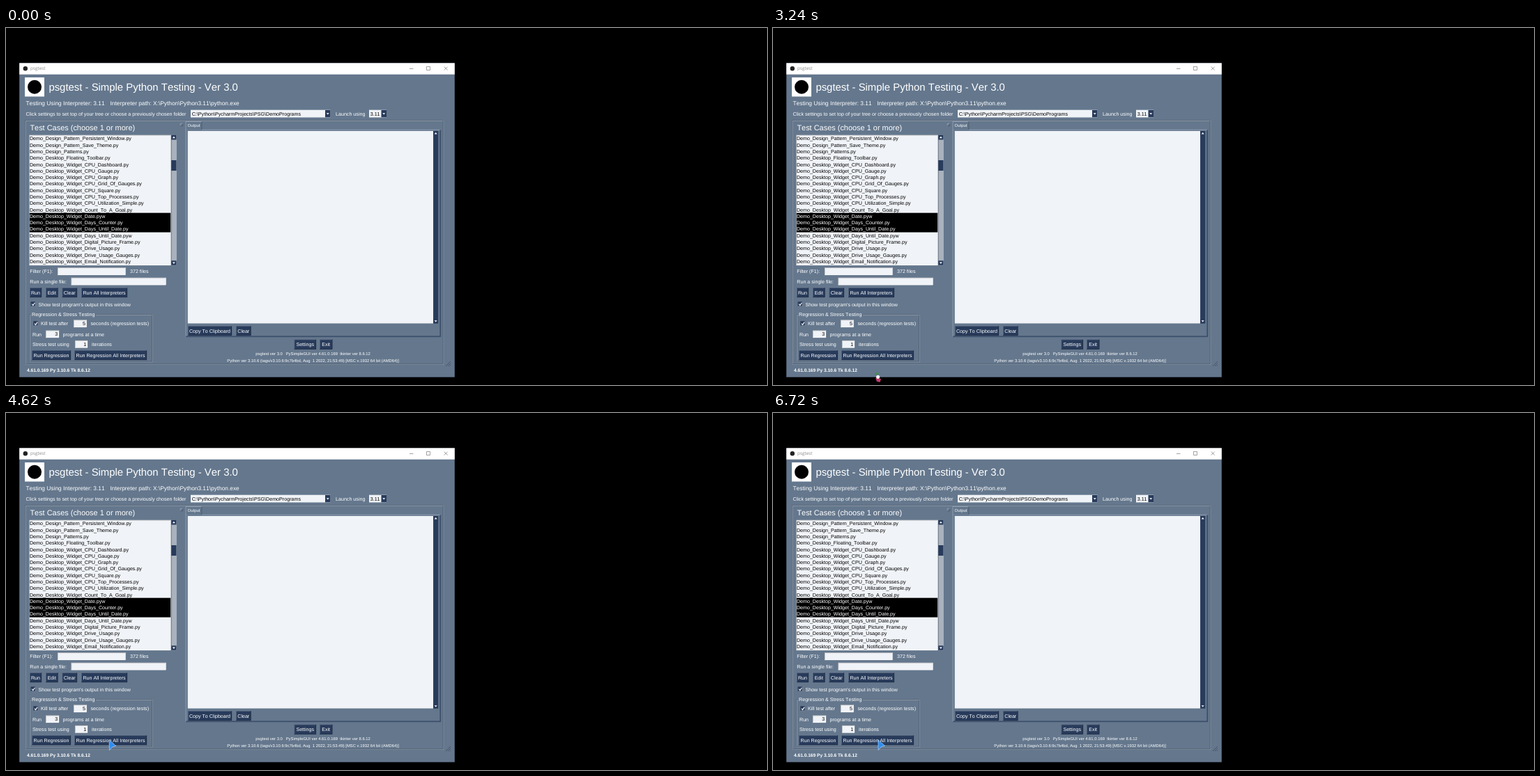
Recreate the animation shown at these times as an HTML page. Size 1092 px wide and 513 px high, loop 8 s.

```html
<!DOCTYPE html>
<html lang="en">
<head>
<meta charset="utf-8">
<title>psgtest</title>
<style>
  html, body { margin: 0; width: 100%; height: 100%; overflow: hidden; background: #000; }
  svg { display: block; width: 100vw; height: 100vh; }
  text {
    font-family: "Liberation Sans", Arial, sans-serif;
    font-kerning: none;
    text-rendering: geometricPrecision;
    white-space: pre;
  }
</style>
</head>
<body>
<svg id="stage" viewBox="0 0 1092 513"></svg>
<script>
const PANEL = '#64778d', NAVY = '#283b5b', FIELD = '#f0f3f7';
const LIGHT = '#b2bbc6', SHADE = '#3c4755', HAIR = 0.55;
const LOOP = 8000;
const parts = [];

const add = markup => parts.push(markup);
const rect = (x1, y1, x2, y2, fill, extra = '') =>
  add(`<rect x="${x1}" y="${y1}" width="${x2 - x1}" height="${y2 - y1}" fill="${fill}" ${extra}/>`);
const path = (d, stroke, width = HAIR, fill = 'none') =>
  add(`<path d="${d}" fill="${fill}" stroke="${stroke}" stroke-width="${width}"/>`);
// Text is placed by its vertical centre.
const text = (x, cy, words, size = 7.13, fill = '#fff', extra = '') =>
  add(`<text x="${x}" y="${cy + size * 0.36}" font-size="${size}" fill="${fill}" ${extra}>${words}</text>`);

// Bevelled edge: one colour for top and left, another for bottom and right.
function bevel(x1, y1, x2, y2, topLeft, bottomRight) {
  const h = HAIR / 2;
  path(`M${x1 + h} ${y2}V${y1 + h}H${x2}`, topLeft);
  path(`M${x1} ${y2 - h}H${x2 - h}V${y1}`, bottomRight);
}

function groove(x1, y1, x2, y2) {
  bevel(x1, y1, x2, y2, SHADE, LIGHT);
  bevel(x1 + HAIR, y1 + HAIR, x2 - HAIR, y2 - HAIR, LIGHT, SHADE);
}

function button(x1, y1, x2, y2, label) {
  rect(x1, y1, x2, y2, NAVY);
  bevel(x1, y1, x2, y2, '#7f8ba0', '#182337');
  text((x1 + x2) / 2, (y1 + y2) / 2, label, 7.1, '#fff', 'text-anchor="middle"');
}

function field(x1, y1, x2, y2, value = '') {
  rect(x1, y1, x2, y2, FIELD);
  bevel(x1, y1, x2, y2, '#909294', '#fff');
  if (value) text(x2 - 1.7, (y1 + y2) / 2, value, 7.13, '#000', 'text-anchor="end"');
}

function arrowButton(x1, y1, x2, y2, dir) {
  rect(x1, y1, x2, y2, NAVY);
  const cx = (x1 + x2) / 2, cy = (y1 + y2) / 2;
  path(`M${cx - 2} ${cy - dir}h4l-2 ${dir * 2.4}z`, 'none', 0, '#fff');
}

function combo(x1, x2, value) {
  rect(x1, 117.7, x2, 128.5, FIELD);
  arrowButton(x2 - 7.5, 118, x2, 128.3, 1);
  text(x1 + 1.7, 123, value, 7.15, '#000');
}

function checkbox(x, y) {
  rect(x, y, x + 7, y + 7, NAVY);
  bevel(x, y, x + 7, y + 7, SHADE, LIGHT);
  path(`M${x + 1.5} ${y + 3.4}l1.6 1.9 2.6 -3.9`, '#fff', 1.1);
}

function titleBar() {
  rect(19.2, 50.4, 643.8, 66.7, '#fff');
  add('<circle cx="27.8" cy="58.3" r="3.2" fill="#222"/>');
  text(35, 58.2, 'psgtest', 6.35, '#888', 'style="font-family:\'Open Sans\',sans-serif"');
  path('M579 58.5h5.5M603.5 55.5h5v5h-5zM628.7 55.6l5 5M633.7 55.6l-5 5', '#555');
}

function header() {
  rect(27, 71, 55, 98.5, '#fff');
  add('<circle cx="41" cy="84.7" r="10" fill="#000"/>');
  text(61.4, 85, 'psgtest - Simple Python Testing - Ver 3.0', 14.9);
  text(28.5, 107.7, 'Testing Using Interpreter: 3.11', 8.38);
  text(149.5, 107.7, 'Interpreter path: X:\\Python\\Python3.11\\python.exe', 8.33);
  text(28.5, 123, 'Click settings to set top of your tree or choose a previously chosen folder', 7.15);
  combo(265, 465.5, 'C:\\Python\\PycharmProjects\\PSG\\DemoPrograms');
  text(473, 123, 'Launch using');
  combo(521, 546, '3.11');
}

function fileList() {
  const files = `Design_Pattern_Persistent_Window.py Design_Pattern_Save_Theme.py Design_Patterns.py
    Desktop_Floating_Toolbar.py Widget_CPU_Dashboard.py Widget_CPU_Gauge.py Widget_CPU_Graph.py
    Widget_CPU_Grid_Of_Gauges.py Widget_CPU_Square.py Widget_CPU_Top_Processes.py
    Widget_CPU_Utilization_Simple.py Widget_Count_To_A_Goal.py Widget_Date.pyw Widget_Days_Counter.py
    Widget_Days_Until_Date.py Widget_Days_Until_Date.pyw Widget_Digital_Picture_Frame.py
    Widget_Drive_Usage.py Widget_Drive_Usage_Gauges.py Widget_Email_Notification.py`.split(/\s+/);
  const top = 154.2, rowHeight = 9.29;
  text(34.4, 143.3, 'Test Cases (choose 1 or more)', 10.95);
  rect(33.3, 153.8, 236.6, 341, FIELD);
  bevel(33.3, 153.8, 236.6, 341, '#909294', '#fff');
  rect(33.8, top + 12 * rowHeight, 236.2, top + 15 * rowHeight, '#000');
  files.forEach((file, i) => {
    const name = 'Demo_' + file.replace(/^Widget/, 'Desktop_Widget');
    text(34, top + (i + .5) * rowHeight, name, 7.1, i > 11 && i < 15 ? '#fff' : '#000');
  });
  rect(237, 153.8, 244.7, 341, '#a9b2bd');
  bevel(237, 153.8, 244.7, 341, SHADE, LIGHT);
  arrowButton(237.2, 154, 244.5, 160.5, -1);
  rect(237.2, 190, 244.5, 205, NAVY);
  arrowButton(237.2, 334.3, 244.5, 340.8, 1);
}

function leftControls() {
  text(34.3, 349.6, 'Filter (F1):');
  field(74, 344.3, 171.5, 355);
  text(178, 349.6, '372 files');
  text(34.3, 364, 'Run a single file:');
  field(93.5, 358.8, 229.5, 369.3);
  button(34, 373, 51, 387, 'Run');
  button(57, 373, 74.5, 387, 'Edit');
  button(80.5, 373, 102, 387, 'Clear');
  button(108, 373, 174, 387, 'Run All Interpreters');
  checkbox(35.7, 393.3);
  text(46.5, 397, "Show test program's output in this window", 7.1);

  groove(33.6, 411.6, 210.6, 480);
  rect(36, 407, 129, 416, PANEL);
  text(37, 411.6, 'Regression &amp; Stress Testing', 7.15);
  checkbox(39.4, 421.2);
  text(50, 424.7, 'Kill test after');
  field(97, 419.4, 115.7, 430, '5');
  text(121.5, 424.7, 'seconds (regression tests)');
  text(38, 440, 'Run');
  field(57, 434.6, 76, 445, '3');
  text(81.5, 440, 'programs at a time');
  text(38, 454.3, 'Stress test using');
  field(99, 449, 117, 459.5, '1');
  text(123, 454.3, 'iterations');
  button(37, 463, 93, 477, 'Run Regression');
  button(98, 463, 202, 477, 'Run Regression All Interpreters');
}

function outputPane() {
  rect(250, 137, 254, 141, PANEL);
  bevel(250, 137, 254, 141, LIGHT, SHADE);
  bevel(257.8, 146, 624, 444, LIGHT, NAVY);
  path('M623 146.5V443H258.5', NAVY, .8);
  rect(258, 134.3, 281, 146.6, PANEL);
  path('M258 146.6V134.5H280.8', LIGHT);
  path('M280.8 134.5V146', SHADE);
  text(260.5, 140.3, 'Output', 6);
  rect(260.8, 148, 613, 424.5, FIELD);
  rect(613.2, 148, 620.2, 424.5, NAVY);
  arrowButton(613.4, 148.3, 620, 154.5, -1);
  arrowButton(613.4, 418, 620, 424.3, 1);
  button(261, 428, 324, 442, 'Copy To Clipboard');
  button(330, 428, 351.5, 442, 'Clear');
}

function footer() {
  const centred = 'text-anchor="middle"';
  button(413.5, 447.5, 445, 461.7, 'Settings');
  button(450, 447.5, 468.3, 461.7, 'Exit');
  text(440.6, 468, 'psgtest ver 3.0   PySimpleGUI ver 4.61.0.169  tkinter ver 8.6.12', 5.87, '#fff', centred);
  text(440.6, 478, 'Python ver 3.10.6 (tags/v3.10.6:9c7b4bd, Aug  1 2022, 21:53:49) [MSC v.1932 64 bit (AMD64)]',
    5.87, '#fff', centred);
  text(30, 492, '4.61.0.169 Py 3.10.6 Tk 8.6.12', 6.6, '#fff', 'font-weight="bold"');
  path('M631 486l7 -7M634 486l4 -4M637 486l1 -1', SHADE, .7);
}

rect(0, 0, 1092, 513, '#000');
rect(19.2, 50.4, 643.8, 501.7, PANEL);
titleBar();
header();
groove(27.2, 132.5, 628, 483.8);
fileList();
leftControls();
outputPane();
footer();
add(`<g id="busy">
  <path d="M145.5 498l3 -3 3.5 1 -1.5 2.5z" fill="#3f8f4c"/>
  <path d="M147 503l8 1 -1.5 5 -4.5 -1z" fill="#c23a6c"/>
  <circle cx="150.6" cy="501.5" r="2.5" fill="#fff"/>
</g>
<path id="cursor" d="M0 0L9.8 8.6 4.7 10 .4 14.8Z" fill="#2f8df0" stroke="#c4dffa" stroke-width=".6" stroke-linejoin="round"/>`);

const stage = document.getElementById('stage');
stage.innerHTML = parts.join('');
const busy = document.getElementById('busy');
const cursor = document.getElementById('cursor');

// Pointer tip as [time, x, y]; each position holds until the next.
const moves = [
  [3480, 149.8, 493], [3620, 149.8, 490.5], [3780, 149.8, 489], [3900, 149.8, 488.4],
  [4460, 149.5, 484], [4500, 149, 478], [4560, 148.5, 473], [4620, 148, 469.8],
  [4740, 152, 467], [4780, 155.5, 465], [5020, 150, 464.6], [5040, 147.8, 464.3],
  [6160, 148.3, 465.8], [6180, 148.6, 467], [6560, 150, 468.5], [6580, 150.6, 469.4], [6720, 150.8, 469.6]
];

function draw(now) {
  const t = now % LOOP;
  const pose = moves.filter(move => move[0] <= t).pop();
  busy.style.display = t >= 3240 && t < 3480 ? '' : 'none';
  cursor.style.display = pose ? '' : 'none';
  if (pose) cursor.setAttribute('transform', `translate(${pose[1]} ${pose[2]})`);
}

const start = performance.now();
function tick() {
  draw(performance.now() - start);
  requestAnimationFrame(tick);
}
tick();
</script>
</body>
</html>
```
